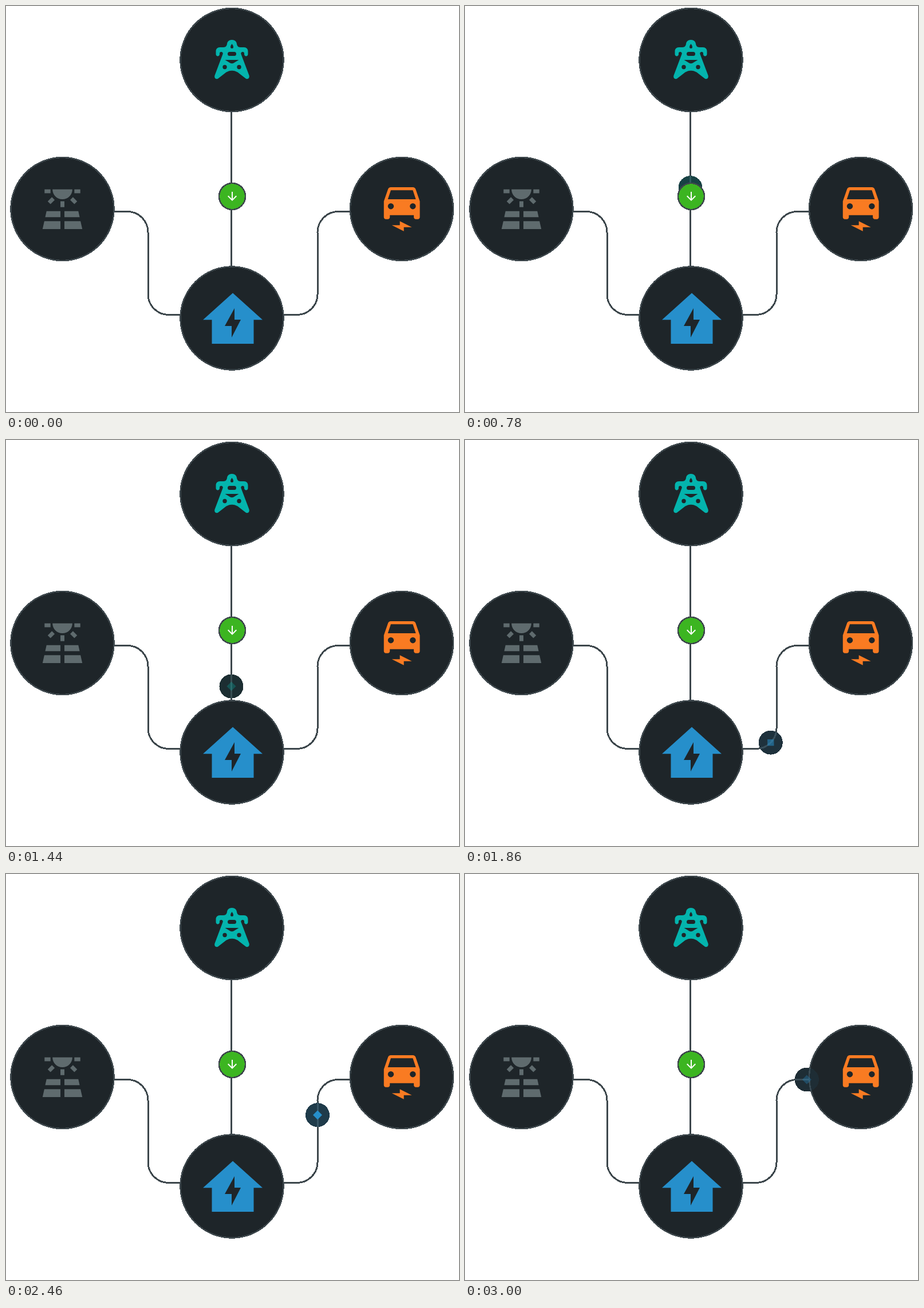
An HTML page that plays this animation: 791x708 px, repeating every 3.03 s.

```html
<!DOCTYPE html>
<html lang="en">
<head>
<meta charset="utf-8">
<title>Energy flow</title>
<style>
html, body { margin: 0; width: 100%; height: 100%; overflow: hidden; background: #fff; }
svg { display: block; }
.wire { fill: none; stroke: #3d474c; stroke-width: 3; }
.node { fill: #1e2529; stroke: #3d474c; stroke-width: 2.5; }
.base, .dark { fill: #1e2529; }
.crisp { shape-rendering: crispEdges; }
.teal { fill: #04b4ad; }
.blue { fill: #268fcb; }
</style>
</head>
<body>
<svg width="791" height="708" viewBox="0 0 791 708">
  <defs>
    <path id="halfTower" d="M-.5 59H0C5 59 8 62 8.5 66C9.200 71 12 72 16 72H21C25.500 72 28 75 28 79V84C28 88.500 21.500 88.500 21.500 84V82Q21 79.500 18 80Q15 81 16 84L30 121C31.500 126 27 129 23.500 126L10 115.500Q5 112.500 -.5 112.500Z"/>
  </defs>
  <g class="crisp">
    <circle class="base" r="21"/>
    <circle class="base" r="21"/>
    <path class="wire" d="M189 358.500H212A36 36 0 0 1 248 394.500V502.500A36 36 0 0 0 284 538.500H305"/>
    <path class="wire track" d="M393.500 184.300V470"/>
    <path class="wire track" d="M485 538.500H508A36 36 0 0 0 544 502.500V394.500A36 36 0 0 1 580 358.500H620"/>
    <circle class="node" cx="394.500" cy="94" r="90"/>
    <circle class="node" cx="98.500" cy="354" r="90"/>
    <circle class="node" cx="691" cy="354" r="90"/>
    <circle class="node" cx="394.500" cy="544.500" r="90"/>
  </g>

  <!-- power tower -->
  <g transform="translate(394.500)">
    <use href="#halfTower" class="teal"/>
    <use href="#halfTower" class="teal" transform="scale(-1 1)"/>
    <g class="dark">
      <path d="M0 66Q2.500 69 2.500 71.500A2.500 2.500 0 0 1 -2.500 71.500Q-2.500 69 0 66Z"/>
      <rect x="-7.500" y="80" width="15" height="7" rx="3.500"/>
      <path d="M-12 94H12L3 99.500Q0 101 -3 99.500Z"/>
      <circle cx="-12.500" cy="106.500" r="3.700"/>
      <circle cx="12.500" cy="106.500" r="3.700"/>
    </g>
  </g>

  <!-- solar panel -->
  <g transform="translate(56.900 312.700) scale(3.470)" fill="#5f6b6e">
    <path d="M3.330 16H11V13H4zM13 16h7.670L20 13h-7zM21.110 18H13v4h9zM2 22h9v-4H2.890zM11 8h2v3h-2zM3 2h3v2H3zM18 2h3v2h-3zM12 7c2.760 0 5-2.240 5-5H7c0 2.760 2.240 5 5 5z"/>
    <rect x="-1" y="-1.500" width="2" height="3" transform="translate(6.350 7.700) rotate(45)"/>
    <rect x="-1" y="-1.500" width="2" height="3" transform="translate(17.650 7.700) rotate(-45)"/>
  </g>

  <!-- electric car -->
  <path transform="translate(649.300 312.500) scale(3.490)" fill="#f97b22" d="M18.920 2.010C18.720 1.420 18.160 1 17.500 1h-11c-.66 0-1.210.42-1.420 1.010L3 8v8c0 .55.45 1 1 1h1c.55 0 1-.45 1-1v-1h12v1c0 .55.45 1 1 1h1c.55 0 1-.45 1-1V8zM6.500 12a1.500 1.500 0 1 1 0-3 1.500 1.500 0 0 1 0 3zM17.500 12a1.500 1.500 0 1 1 0-3 1.500 1.500 0 0 1 0 3zM5 7l1.500-4.500h11L19 7zM7 20h4v-2l6 3h-4v2z" fill-rule="evenodd"/>

  <!-- house -->
  <path class="blue" d="M396 500.500L448 547.300H432.500V589H359.500V547.300H344Z"/>
  <path class="dark" d="M399 527V547H410L394 578V558H382Z"/>

  <g class="pulse teal"><circle class="crisp" r="21" opacity=".2"/><path d="M-8 0L0-8 8 0 0 8Z"/></g>
  <g class="pulse blue"><circle class="crisp" r="21" opacity=".2"/><path d="M-8 0L0-8 8 0 0 8Z"/></g>

  <!-- direction badge -->
  <circle class="crisp" cx="395" cy="332" r="23" fill="#3cb521" stroke="#3d474c" stroke-width="2.500"/>
  <path transform="translate(383 320)" fill="#fff" d="M20 12l-1.410-1.410L13 16.170V4h-2v12.170l-5.580-5.590L4 12l8 8z"/>
</svg>
<script>
const LOOP = 3030, STEP = 30, LIFE = 1600, FADE = 480;
const all = s => document.querySelectorAll(s);
const bases = all('.base'), tracks = all('.track'), pulses = all('.pulse');
const runs = [{ start: 0, speed: .1703 }, { start: 1578, speed: .1835 }];

function draw(now) {
  const t = Math.floor(now % LOOP / STEP) * STEP;
  runs.forEach(({ start, speed }, i) => {
    const age = t - start, on = age > 0 && age < LIFE;
    bases[i].style.display = pulses[i].style.display = on ? '' : 'none';
    if (!on) return;
    const at = d => tracks[i].getPointAtLength(d), d = age * speed;
    const p = at(d), a = at(d - .5), b = at(d + .5);
    const angle = Math.atan2(b.y - a.y, b.x - a.x) * 180 / Math.PI;
    const place = `translate(${p.x} ${p.y})`;
    bases[i].setAttribute('transform', place);
    pulses[i].setAttribute('transform', `${place} rotate(${angle})`);
    pulses[i].setAttribute('opacity', Math.min(1, age / FADE, (LIFE - age) / FADE));
  });
}

const began = performance.now();
(function tick() {
  draw(performance.now() - began);
  requestAnimationFrame(tick);
})();
</script>
</body>
</html>
```
